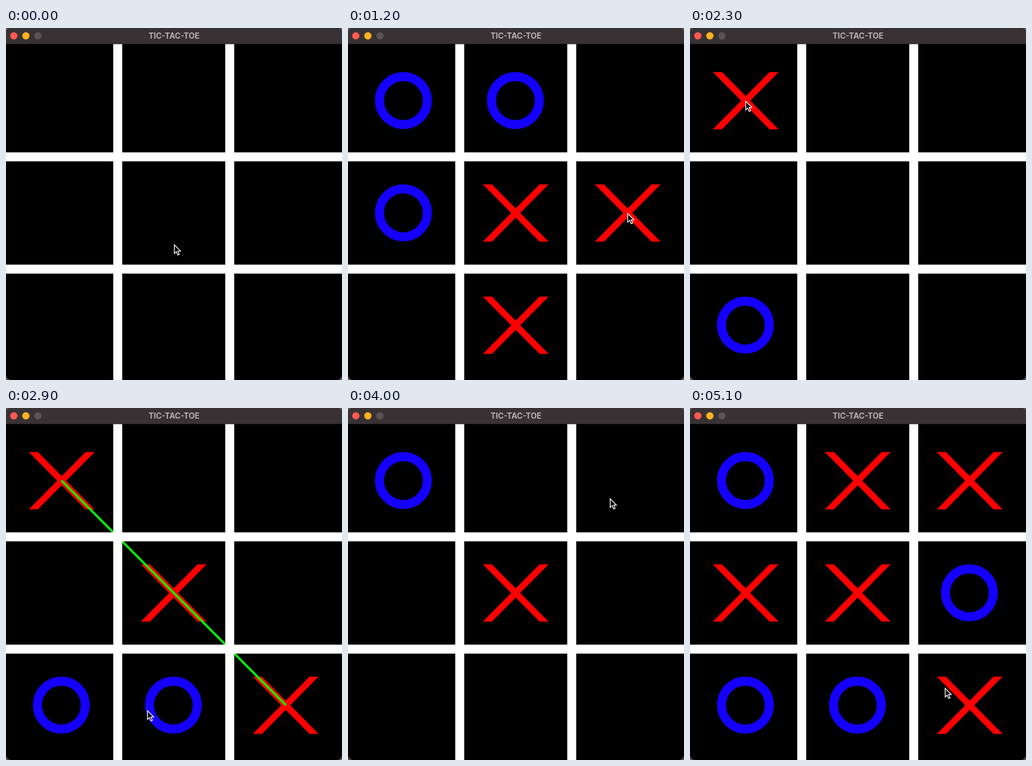
An HTML page with a canvas that plays this animation: 600x627 px, repeating every 5900 ms.

```html
<!DOCTYPE html>
<html lang="en">
<head>
<meta charset="utf-8">
<title>Tic-tac-toe</title>
<style>
  html, body { margin: 0; width: 100%; height: 100%; overflow: hidden; background: #5d5054; }
  canvas { display: block; }
</style>
</head>
<body>
<canvas width="600" height="627"></canvas>
<script>
const ctx = document.querySelector('canvas').getContext('2d');
const LOOP = 5900, STEP = 100, BAR = 28.5;

// Cells count 0-8 from the top left. Each X is answered by an O at once.
const games = [
  { start: 0, first: 400, every: 400, xs: '4758', os: '0132' },
  { start: 2000, first: 2300, every: 250, xs: '048', os: '67' },
  { start: 3500, first: 3760, every: 320, xs: '42318', os: '0657' },
];
const lines = ['012', '345', '678', '036', '147', '258', '048', '246'];

// Where the pointer pauses or turns between clicks
const rests = [
  { from: 0, x: 300, y: 385 },
  { from: 700, to: 900, x: 333, y: 529 },
  { from: 1300, x: 485, y: 118 },
  { from: 1500, x: 58, y: 500 },
  { from: 1600, to: 1800, x: 487, y: 529 },
  { from: 2900, to: 3200, x: 252, y: 538 },
  { from: 3700, x: 298, y: 295 },
  { from: 4400, x: 140, y: 333 },
  { from: 5100, to: LOOP, x: 455, y: 498 },
].map(rest => ({ to: rest.from, ...rest }));

const center = cell => [98.9 + cell % 3 * 200, 129.2 + Math.floor(cell / 3) * 200];

// Otherwise it goes to the middle of each clicked cell.
const clicks = games.flatMap(({ first, every, xs }) => [...xs].map((cell, i) => {
  const time = first + i * every, [x, y] = center(cell);
  return { from: time, to: time, x, y };
})).filter(click => !rests.some(rest => rest.from <= click.from && click.from <= rest.to));
const stops = [...rests, ...clicks].sort((a, b) => a.from - b.from);

function polygon(points, color) {
  ctx.beginPath();
  points.forEach(([x, y]) => ctx.lineTo(x, y));
  ctx.closePath();
  ctx.fillStyle = color;
  ctx.fill();
}

function disc(x, y, r, color) {
  ctx.beginPath();
  ctx.arc(x, y, r, 0, 2 * Math.PI);
  ctx.fillStyle = color;
  ctx.fill();
}

function drawX(cell) {
  const [x, y] = center(cell);
  for (const side of [-1, 1]) {
    polygon([[58.7, -50.8], [42.5, -50.8], [-58.7, 51.4], [-42.5, 51.4]]
      .map(([dx, dy]) => [x + 0.6 + side * dx, y + dy]), '#f00');
  }
}

function drawO(cell) {
  ctx.beginPath();
  ctx.arc(...center(cell), 42.7, 0, 2 * Math.PI);
  ctx.strokeStyle = '#1400ff';
  ctx.lineWidth = 16;
  ctx.stroke();
}

function drawWin(cells) {
  const line = lines.find(line => [...line].every(cell => cells.includes(cell)));
  if (!line) return;
  const [x0, y0] = center(line[0]), [x1, y1] = center(line[2]);
  ctx.beginPath();
  ctx.moveTo(x0, y0);
  ctx.lineTo(x1 + 0.8, y1);
  ctx.strokeStyle = '#0f0';
  ctx.lineWidth = x0 !== x1 && y0 !== y1 ? 3.8 : 5.6;
  ctx.stroke();
}

function drawBoard(t) {
  const { first, every, xs, os } = games.findLast(game => game.start <= t);
  const turns = Math.max(0, Math.floor((t - first) / every) + 1);
  for (const [cells, drawMark] of [[xs, drawX], [os, drawO]]) [...cells.slice(0, turns)].forEach(drawMark);
  for (const cells of [xs, os]) drawWin(cells.slice(0, turns));

  ctx.fillStyle = '#fff';
  for (const i of [0, 1]) {
    ctx.fillRect(191.5 + i * 200, BAR, 16, 600);
    ctx.fillRect(0, 221.5 + i * 200, 600, 16);
  }
}

function drawTitleBar() {
  ctx.fillStyle = '#393234';
  ctx.fillRect(0, 0, 600, BAR);
  ['#ff5a52', '#fdb324', '#5a5355'].forEach((color, i) => disc(14 + i * 21.5, 14, 6.5, color));
  ctx.font = '700 14px Inter, sans-serif';
  ctx.textAlign = 'center';
  ctx.fillStyle = '#b5b0b2';
  ctx.fillText('TIC-TAC-TOE', 300, 18.7);
}

function drawPointer(t) {
  const i = stops.findLastIndex(stop => stop.from <= t);
  const here = stops[i], next = stops[i + 1] || here;
  const k = t <= here.to ? 0 : (t - here.to) / (next.from - here.to);
  const ease = k * k * (3 - 2 * k);
  ctx.save();
  ctx.translate(here.x + (next.x - here.x) * ease + 0.6, here.y + (next.y - here.y) * ease + 1.2);
  polygon([[0, 0], [0, 15.5], [3.6, 12.2], [6.2, 18.2], [8.8, 17.1], [6.3, 11.3], [11, 11.1]], '#000');
  ctx.strokeStyle = '#fff';
  ctx.lineWidth = 1.4;
  ctx.stroke();
  ctx.restore();
}

function draw(t) {
  ctx.clearRect(0, 0, 600, 627);
  ctx.save();
  ctx.beginPath();
  ctx.roundRect(0, 0, 600, 627, 9);
  ctx.clip();
  ctx.fillStyle = '#000';
  ctx.fillRect(0, 0, 600, 627);
  drawBoard(t);
  drawTitleBar();
  drawPointer(t);
  ctx.restore();
}

const began = performance.now();
function frame() {
  const t = (performance.now() - began) % LOOP;
  draw(Math.floor(t / STEP) * STEP);
  requestAnimationFrame(frame);
}
frame();
</script>
</body>
</html>
```
